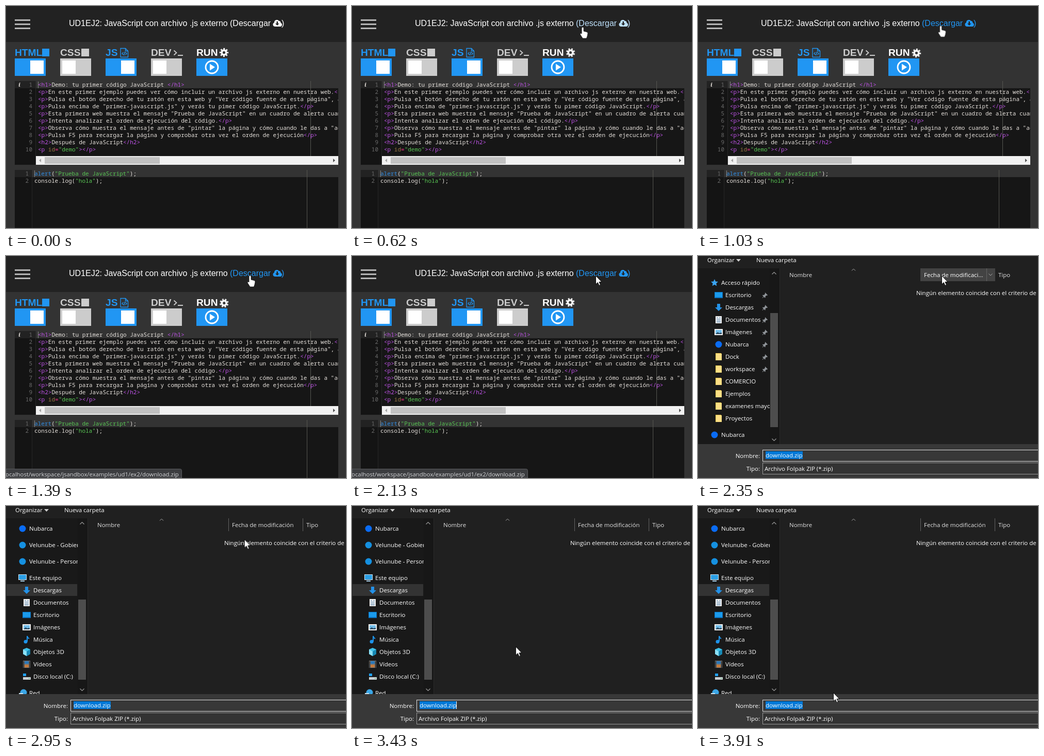
Animation, 659 px wide and 432 px high, one loop 3980 ms. Source, as an HTML page:

```html
<!DOCTYPE html>
<html lang="es">
<head>
<meta charset="utf-8">
<title>Descarga de un ejemplo</title>
<style>
html, body { margin: 0; width: 100%; height: 100%; overflow: hidden; background: #333; }
svg { display: block; width: 659px; height: 432px; }
text { white-space: pre; }
.title { font: 16px "Liberation Sans", Arial, sans-serif; }
.label { font: bold 19.2px "Liberation Sans", Arial, sans-serif; }
.code { font: 11px "Noto Sans Mono", monospace; fill: #e6e1dc; }
.num { fill: #6b6b6b; text-anchor: end; }
.ui { font: 11.5px "Open Sans", "Noto Sans", sans-serif; fill: #fff; }
.end { text-anchor: end; }
.tag { fill: #be53e6; } .attr { fill: #997744; } .op { fill: #ff308f; }
.str { fill: #58c554; } .fn { fill: #308bdf; }

.step, .move, #link, #gear { animation: 3980ms infinite; }
.step { animation-timing-function: step-end; }
#link { animation-name: hover; fill: #fff; }
#gear { animation-name: spin; animation-timing-function: linear; transform-origin: 423px 91px; }
#status { animation-name: status; }
#dialog { animation-name: dialog; }
#content { animation-name: content; }
#sideTop { animation-name: sideTop; }
#sideLow { animation-name: sideLow; }
#hotColumn { animation-name: hotColumn; }
#caret { animation-name: caret; }
#cursor { animation-name: cursor; }
#beam { animation-name: beam; }
#hand { animation-name: hand; }
#arrow { animation-name: arrow; }

@keyframes hover { 0%, 13.85% { fill: #fff; } 22.6%, 100% { fill: #2196f3; } }
@keyframes spin { to { transform: rotate(716deg); } }
@keyframes status { 0% { opacity: 0; } 29.3%, 100% { opacity: 1; } }
@keyframes dialog { 0% { opacity: 0; } 56%, 100% { opacity: 1; } }
@keyframes content { 0% { opacity: 0; } 57.2%, 100% { opacity: 1; } }
@keyframes sideTop { 0% { opacity: 1; } 60.75%, 100% { opacity: 0; } }
@keyframes sideLow { 0% { opacity: 0; } 60.75%, 100% { opacity: 1; } }
@keyframes hotColumn { 0% { opacity: 1; } 72.3%, 100% { opacity: 0; } }
@keyframes caret { 0% { opacity: 0; } 60.75% { opacity: 1; } 71.6% { opacity: 0; } 84.9% { opacity: 1; } 98.2%, 100% { opacity: 0; } }
@keyframes beam { 0% { opacity: 1; } 13.3%, 100% { opacity: 0; } }
@keyframes hand { 0% { opacity: 0; } 13.3% { opacity: 1; } 47.7%, 100% { opacity: 0; } }
@keyframes arrow { 0% { opacity: 0; } 47.7%, 100% { opacity: 1; } }
@keyframes cursor {
  0%, 1.5% { transform: translate(322px, 34px); animation-timing-function: ease-out; }
  13.82% { transform: translate(438px, 39px); animation-timing-function: linear; }
  15.58% { transform: translate(447px, 41px); animation-timing-function: ease-out; }
  29.4%, 47.7% { transform: translate(473px, 38px); animation-timing-function: step-end; }
  47.71%, 69.5% { transform: translate(472px, 38px); animation-timing-function: ease-in; }
  74.12% { transform: translate(462px, 64px); animation-timing-function: linear; }
  82.66% { transform: translate(351px, 221px); animation-timing-function: ease-out; }
  96.48% { transform: translate(263px, 356px); animation-timing-function: linear; }
  98.24%, 100% { transform: translate(262px, 363px); }
}
</style>
</head>
<body>
<svg id="stage" viewBox="0 0 659 432"></svg>
<script>
const rect = (x, y, w, h, fill, extra = '') =>
  `<rect x="${x}" y="${y}" width="${w}" height="${h}" fill="${fill}" ${extra}/>`;
const dot = (x, y, r, fill) => `<circle cx="${x}" cy="${y}" r="${r}" fill="${fill}"/>`;
const path = (d, fill, extra = '') => `<path d="${d}" fill="${fill}" ${extra}/>`;
const line = (d, color, width = 1) => path(d, 'none', `stroke="${color}" stroke-width="${width}"`);
const text = (x, y, cls, body, extra = '') => `<text x="${x}" y="${y}" class="${cls}" ${extra}>${body}</text>`;
const group = (id, cls, body) => `<g id="${id}" class="${cls}">${body}</g>`;
const span = (cls, body) => `<tspan class="${cls}">${body}</tspan>`;
const escape = s => s.replace(/</g, '&lt;').replace(/>/g, '&gt;');

const BLUE = '#2196f3', GREY = '#ccc';

/* ---------- web page ---------- */
const markup = [
  '<h1>Demo: tu primer código JavaScript </h1>',
  '<p>En este primer ejemplo puedes ver cómo incluir un archivo js externo en nuestra web.</p>',
  '<p>Pulsa el botón derecho de tu ratón en esta web y "Ver código fuente de esta página", a',
  '<p>Pulsa encima de "primer-javascript.js" y verás tu pimer código JavaScript.</p>',
  '<p>Esta primera web muestra el mensaje "Prueba de JavaScript" en un cuadro de alerta cuan',
  '<p>Intenta analizar el orden de ejecución del código.</p>',
  '<p>Observa cómo muestra el mensaje antes de "pintar" la página y cómo cuando le das a "ace',
  '<p>Pulsa F5 para recargar la página y comprobar otra vez el orden de ejecución</p>',
  '<h2>Después de JavaScript</h2>',
  '<p id="demo"></p>'
];
const script = ['alert("Prueba de JavaScript");', 'console.log("hola");'];

const paintTag = tag => span('tag', escape(tag)
  .replace(/(id)(=)("\w+")/, (_, a, b, c) => span('attr', a) + span('op', b) + span('str', c)));
const paintMarkup = s => s.replace(/<[^>]*>/g, paintTag);
const paintScript = s => s
  .replace(/"[^"]*"/, m => span('str', m.replace(/"/g, '&quot;')))
  .replace(/^alert/, m => span('fn', m));

function editor(y, height, gutter, lines, paint) {
  const left = 17 + gutter, start = left + 4, margin = start + 528;
  return rect(17, y, 627, height, '#161616') + rect(17, y, gutter, height, '#141414') +
    rect(17, y, gutter, 14, '#222') + rect(left, y, 644 - left, 14, '#333') +
    rect(left - 1, y, 1, height, '#282828') + rect(margin, y, 1, height, '#555651') +
    rect(start, y + 1, 1, 13, '#8a8a8a') +
    lines.map((s, i) => text(left - 7, y + 11 + i * 14, 'code num', i + 1) +
      text(start, y + 11 + i * 14, 'code', paint(s))).join('');
}

const toggle = (x, on) => rect(x, 102, 60, 34, on ? BLUE : GREY) + rect(x + (on ? 30 : 4), 106, 26, 26, '#fff');
const label = (x, name, color) => text(x, 97, 'label', name, `fill="${color}"`);

const cloud = '<path d="M521 40a4 4 0 0 1-1-7.700a5 5 0 0 1 9-3.300a3.500 3.500 0 0 1 3.500 4a3.600 3.600 0 0 1-1 7z"/>' +
  path('M524.500 30h2.500v4h2.500l-3.800 4-3.700-4h2.500z', '#222');

const gear = `<g fill="none" stroke="#fff"><circle cx="422.500" cy="90.500" r="4.400" stroke-width="3.600"/>
  <circle cx="422.500" cy="90.500" r="7" stroke-width="3.400" stroke-dasharray="2.749" stroke-dashoffset="1.370"/></g>`;

const page = rect(0, 0, 659, 432, '#333') + rect(0, 0, 659, 70, '#222') +
  [26, 34, 42].map(y => rect(17, y, 30, 3, '#b5b5b5')).join('') +
  text(122, 39, 'title', 'UD1EJ2: JavaScript con archivo .js externo', 'fill="#fff"') +
  group('link', '', text(434, 39, 'title', '(Descargar') + cloud + text(534, 39, 'title', ')')) +
  label(17, 'HTML', BLUE) + rect(70, 83, 14, 15, BLUE) +
  label(105, 'CSS', GREY) + rect(146, 83, 15, 15, GREY) +
  label(193, 'JS', BLUE) +
  line('M222 82.500h9.500l5 5V99.500h-14.500zM231.500 82.500v5h5M227.500 90l-2.500 2.500 2.500 2.500M231.500 90l2.500 2.500-2.500 2.500M230.500 89l-2 7', BLUE, 1.3) +
  label(281, 'DEV', GREY) + line('M325.500 86.500l5 4.500-5 4.500M333 96h10', GREY, 1.8) +
  label(369, 'RUN', '#fff') + group('gear', '', gear) +
  toggle(17, true) + toggle(105, false) + toggle(193, true) + toggle(281, false) +
  rect(369, 102, 60, 34, BLUE) +
  '<circle cx="399" cy="119" r="12" fill="none" stroke="#fff" stroke-width="2.800"/>' + path('M395 112.500v13l10-6.500z', '#fff') +
  editor(146, 163, 41, markup, paintMarkup) +
  text(24, 157, 'code', 'i', 'style="font:italic bold 11px \'Noto Serif\',serif"') +
  rect(58, 292, 586, 17, '#f1f1f1') + rect(75, 294, 223, 13, '#c1c1c1') +
  path('M68 297v7l-4-3.500z', '#a3a3a3') + path('M634 297v7l4-3.500z', '#505050') +
  editor(319, 113, 34, script, paintScript) +
  rect(644, 146, 15, 286, '#333');

const status = path('M0 414.500H337.500q3 0 3 3V432H0z', '#3c3d40', 'stroke="#5a5b5e"') +
  text(-1, 429, 'ui', 'ocalhost/workspace/jsandbox/examples/ud1/ex2/download.zip', 'style="font-size:11.400px;fill:#d5d6d8"');

/* ---------- save dialog ---------- */
const icons = {
  star: (x, y) => path(`M${x} ${y - 7}l2 4.500 5 .5-3.700 3.300 1 5-4.300-2.600-4.300 2.600 1-5-3.700-3.300 5-.5z`, '#3ba4f0'),
  desk: (x, y) => rect(x - 8, y - 6, 16, 12, '#0a74c4') + rect(x - 7, y - 5, 14, 9, '#1b9bec'),
  down: (x, y) => path(`M${x - 3} ${y - 7}h6v7h4l-7 7-7-7h4z`, '#2492e8'),
  doc: (x, y) => rect(x - 6, y - 7, 12, 14, '#f2f2f2') + line(`M${x - 4} ${y - 4}h3m2 0h3M${x - 4} ${y - 1}h8m-8 3h8m-8 2.500h8`, '#4b7da8'),
  image: (x, y) => rect(x - 8, y - 6, 16, 12, '#f2f2f2') + rect(x - 6, y - 4, 12, 8, '#72bdea') + path(`M${x - 6} ${y + 4}l4-4 3 2 5-1v3z`, '#2a4b63'),
  folder: (x, y) => rect(x - 6, y - 7, 11, 14, '#f3c74e') + rect(x - 5, y - 6, 11, 13, '#ffdf85'),
  box: (x, y) => dot(x, y, 6.5, '#0a6cf5'),
  drive: (x, y) => dot(x, y, 6.5, '#1590e0'),
  pc: (x, y) => rect(x - 8, y - 7, 16, 11, '#d8e6ef') + rect(x - 7, y - 6, 14, 9, '#2b9fe5') + rect(x - 4, y + 5, 8, 2, '#9fc6df'),
  music: (x, y) => dot(x - 2, y + 4, 3.5, '#1d93ea') + line(`M${x + 1} ${y + 4}V${y - 7}q1 4 4 5`, '#1d93ea', 2),
  cube: (x, y) => path(`M${x} ${y - 8}l7 3v9l-7 4-7-4v-9z`, '#3fc1e8') + path(`M${x} ${y - 1}l7-4v9l-7 4z`, '#1688b4') + path(`M${x - 7} ${y - 5}l7 4v9l-7-4z`, '#8be0f5'),
  film: (x, y) => rect(x - 7, y - 7, 14, 14, '#777') + rect(x - 4, y - 6, 8, 5, '#2b78b8') + rect(x - 4, y + 1, 8, 5, '#c57a3a') +
    line(`M${x - 5.5} ${y - 6}v13M${x + 5.5} ${y - 6}v13`, '#161616', 1.2),
  disk: (x, y) => rect(x - 7, y + 1, 15, 5, '#c8ced2') + rect(x + 4, y + 3, 2, 1, '#35b44a') + rect(x - 7, y - 6, 6, 5, '#20a0f0'),
  net: (x, y) => dot(x + 2, y - 1, 6.5, '#3ba6e6') + rect(x - 7, y, 8, 6, '#cfe6f3')
};

const pin = y => path(`M130 ${y - 5}l5 5-1 1-1.500-.3-2 2 .2 2.300-1 .5-2-2-2.700 2.500-.5-.5 2.500-2.700-2-2 .5-1 2.300.2 2-2z`, '#8f9499');
const row = (y, name, icon, indent = 8, pinned) =>
  icons[icon](32 + indent, y) + text(45 + indent, y + 4, 'ui', name) + (pinned ? pin(y) : '');
const rows = (first, list, pins = 0) => list.map(([name, icon], i) => row(first + 24 * i, name, icon, 8, i < pins)).join('');
const scrollbar = (top, bottom) => rect(139, 24, 19, 342, '#171717') + rect(140, top, 15, bottom - top, '#4d4d4d') +
  line('M143.500 35.500l4-4 4 4M143.500 355.500l4 4 4-4', '#9a9a9a', 1.2);

const sideTop = row(52, 'Acceso rápido', 'star', 0) +
  rows(76, [['Escritorio', 'desk'], ['Descargas', 'down'], ['Documentos', 'doc'], ['Imágenes', 'image'],
    ['Nubarca', 'box'], ['Dock', 'folder'], ['workspace', 'folder'], ['COMERCIO', 'folder'],
    ['Ejemplos', 'folder'], ['examenes mayo', 'folder'], ['Proyectos', 'folder']], 7) +
  row(348, 'Nubarca', 'box', 0) + scrollbar(111, 333);

const sideLow = rect(1, 152, 137, 23, '#333') + row(44, 'Nubarca', 'box', 0) +
  row(76, 'Velunube - Gobierno', 'drive', 0) + row(108, 'Velunube - Personal', 'drive', 0) + row(140, 'Este equipo', 'pc', 0) +
  rows(164, [['Descargas', 'down'], ['Documentos', 'doc'], ['Escritorio', 'desk'], ['Imágenes', 'image'],
    ['Música', 'music'], ['Objetos 3D', 'cube'], ['Vídeos', 'film'], ['Disco local (C:)', 'disk']]) +
  row(364, 'Red', 'net', 0) + scrollbar(182, 338);

const hotColumn = rect(431, 24, 145, 25, '#434343') + rect(559, 24, 1, 25, '#636363') +
  text(438, 41, 'ui', 'Fecha de modificaci...') + line('M563.500 34.500l3.500 3.500 3.500-3.500', '#a8a8a8');

const content = group('sideTop', 'step', sideTop) + group('sideLow', 'step', sideLow) +
  rect(158, 24, 501, 342, '#202020') + rect(158, 24, 1, 342, '#2b2b2b') +
  text(18, 12, 'ui', 'Organizar') + path('M74 6h9l-4.500 5z', '#d0d0d0') + text(113, 12, 'ui', 'Nueva carpeta') +
  text(177, 41, 'ui', 'Nombre', 'style="fill:#dedede"') + line('M298 28.500l3.500-3.500 3.500 3.500', '#a8a8a8') +
  rect(431, 24, 1, 25, '#636363') + rect(575, 24, 1, 25, '#636363') +
  text(438, 41, 'ui', 'Fecha de modificación', 'style="fill:#dedede"') + text(582, 41, 'ui', 'Tipo', 'style="fill:#dedede"') +
  group('hotColumn', 'step', hotColumn) +
  text(423, 76, 'ui', 'Ningún elemento coincide con el criterio de') +
  rect(0, 366, 659, 66, '#383838') +
  text(120, 393, 'ui end', 'Nombre:') + text(120, 418, 'ui end', 'Tipo:') +
  rect(125.5, 377.5, 540, 22, '#383838', 'stroke="#e4e4e4"') + rect(131, 380, 72, 15, '#0078d7') +
  text(131, 392, 'ui', 'download.zip') + group('caret', 'step', rect(202, 380, 1, 15, '#fff')) +
  rect(125.5, 402.5, 540, 22, '#333', 'stroke="#9b9b9b"') + text(129, 418, 'ui', 'Archivo Folpak ZIP (*.zip)');

const dialog = rect(0, 0, 659, 432, '#202020') + rect(0, 24, 158, 342, '#191919') +
  rect(0, 366, 659, 66, '#383838') + group('content', 'step', content);

/* ---------- pointer ---------- */
const beam = line('M-3-8q3 0 3 2V6q0 2-3 2M3-8q-3 0-3 2V6q0 2 3 2', '#0c0c0c');
const hand = path('M-2 2a2 2 0 0 1 4 0V8l6 1.500q2 .5 2 3l-1 5-1.500 4.500H0l-5-8q0-2.500 2-2l1 1z', '#fff', 'stroke="#111" stroke-width=".8"');
const arrow = path('M.5.5V17l3.800-3.600 2.700 6 2.600-1.100-2.600-5.800H12z', '#fff', 'stroke="#000" stroke-width=".9"');

document.getElementById('stage').innerHTML = page + group('status', 'step', status) + group('dialog', 'step', dialog) +
  group('cursor', 'move', group('beam', 'step', beam) + group('hand', 'step', hand) + group('arrow', 'step', arrow));
</script>
</body>
</html>
```
